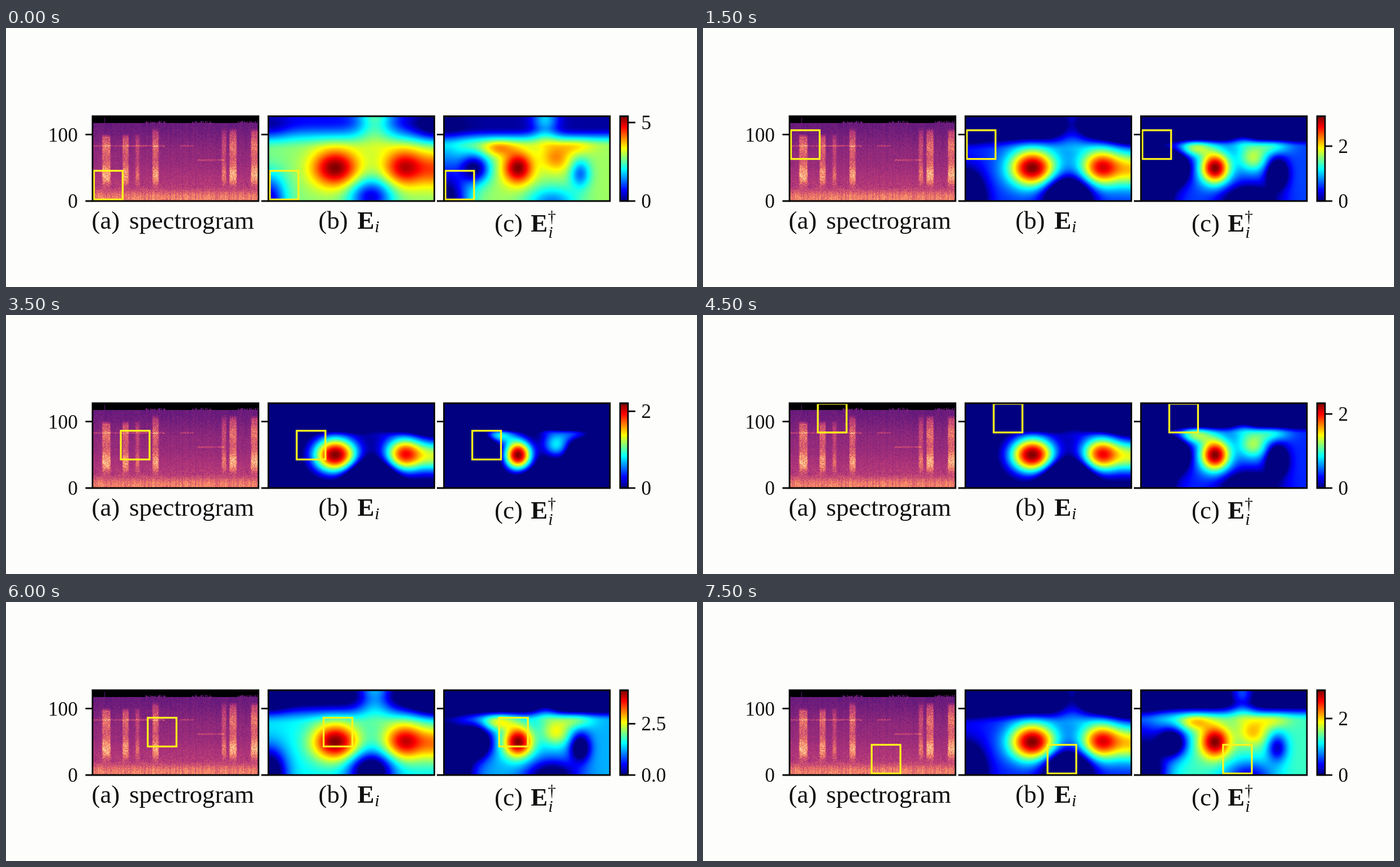
Recreate the animation shown at these times as an HTML page with a canvas. Size 1222x458 px, loop 8 s.

```html
<!DOCTYPE html>
<html lang="en">
<head>
<meta charset="utf-8">
<title>Spectrogram and embeddings</title>
<style>
  html, body { margin: 0; width: 100%; height: 100%; overflow: hidden; background: #fdfdfc; }
  canvas, svg { position: absolute; left: 0; top: 0; display: block; }
  text { font-family: "Liberation Serif", "Times New Roman", serif; fill: #101010; }
  .caption { font-size: 44.7px; }
  .axis { font-size: 35px; }
  .sub { font-size: 30px; font-style: italic; }
  .dagger { font-size: 29px; }
  .line { fill: none; stroke: #060606; stroke-width: 2.8; }
  .box { fill: none; stroke: #fdf41c; stroke-width: 3.3; }
</style>
</head>
<body>
<canvas id="maps" width="1222" height="458"></canvas>
<svg id="art" width="1222" height="458" viewBox="0 0 1222 458"></svg>
<script>
const W = 294, H = 150, TOP = 156, BASE = 306;
const PANELS = [153, 464, 774.5];
const BAR = { x: 1086, w: 14 };
const STEP_MS = 500, STEPS = 16, ROWS = 5, FULL = 5.4;

const clamp = (v, lo = 0, hi = 1) => Math.min(hi, Math.max(lo, v));
const ease = (a, b, v) => { const t = clamp((v - a) / (b - a)); return t * t * (3 - 2 * t); };
const bell = (v, mid, width) => Math.exp(-(((v - mid) / width) ** 2));
const blob = (x, y, mx, my, sx, sy) => bell(x, mx, sx) * bell(y, my, sy);

// Each map is a background level rising from the top edge, with hills and hollows.
const levelB = (x, y) => .13 + .38 * ease(8, 60, y)
  + .49 * blob(x, y, 118, 91, 41, 33)
  + .43 * blob(x, y, 241, 90, 38, 33)
  + .25 * blob(x, y, 300, 94, 32, 32)
  + .32 * blob(x, y, 188, 0, 32, 42)
  - .28 * blob(x, y, 300, 20, 45, 28)
  - .12 * blob(x, y, 0, 20, 35, 25)
  - .42 * blob(x, y, 181, 142, 38, 32)
  - .44 * blob(x, y, 0, 148, 30, 45);

const levelC = (x, y) => .03 + .5 * ease(18, 54, y)
  + .47 * blob(x, y, 130, 91, 26, 28)
  + .2 * blob(x, y, 95, 56, 28, 14)
  + .2 * blob(x, y, 198, 74, 26, 24)
  + .12 * blob(x, y, 232, 54, 30, 14)
  + .3 * blob(x, y, 178, 0, 24, 42)
  - .3 * blob(x, y, 240, 101, 18, 25)
  - .5 * blob(x, y, 54, 92, 26, 26)
  - .36 * blob(x, y, 0, 115, 40, 75)
  - .3 * blob(x, y, 5, 150, 40, 35)
  - .28 * blob(x, y, 190, 152, 45, 28);

// Key points: step, colour scale maximum, cut-off of the right-hand map.
const KEYS = [[0, FULL, 0], [1, 3.9, .25], [3, 3.09, .42], [5, 3.26, .27], [7, 2.21, .6],
  [9, 2.29, .44], [10, 4.2, .35], [13, 4.1, .32], [15, 3, .17]];

function keyed(step, item) {
  const i = KEYS.findIndex(key => key[0] >= step);
  if (KEYS[i][0] === step) return KEYS[i][item];
  const a = KEYS[i - 1], b = KEYS[i];
  return a[item] + (b[item] - a[item]) * (step - a[0]) / (b[0] - a[0]);
}

function makeField(level) {
  const field = new Float32Array(W * H);
  let peak = 0;
  for (let i = 0; i < field.length; i++) {
    field[i] = level(i % W, Math.floor(i / W));
    peak = Math.max(peak, field[i]);
  }
  return field.map(v => v / peak);
}

const jet = v => [3, 2, 1].map(c => 255 * clamp(1.5 - Math.abs(4 * v - c)));

const MAGMA = [[0, 0, 4], [81, 18, 124], [183, 55, 121], [252, 137, 97], [252, 253, 191]];
function magma(v) {
  const p = clamp(v) * 4, i = Math.min(3, Math.floor(p));
  return MAGMA[i].map((c, n) => c + (MAGMA[i + 1][n] - c) * (p - i));
}

function random(seed) {
  return () => {
    seed = seed + 0x6D2B79F5 | 0;
    let t = Math.imul(seed ^ seed >>> 15, 1 | seed);
    t = t + Math.imul(t ^ t >>> 7, 61 | t) ^ t;
    return ((t ^ t >>> 14) >>> 0) / 4294967296;
  };
}

const ctx = document.getElementById("maps").getContext("2d");

function paint(left, width, colour) {
  const img = ctx.createImageData(width, H);
  for (let y = 0, n = 0; y < H; y++) {
    for (let x = 0; x < width; x++) {
      for (const c of colour(x, y)) img.data[n++] = c;
      img.data[n++] = 255;
    }
  }
  ctx.putImageData(img, Math.round(left), TOP);
}

// Vertical calls: centre and half width.
const CALLS = [[24, 7], [58, 5], [79, 3], [111, 5], [232, 3.5], [248, 6], [286, 6]];
// Horizontal streaks: left, right and height.
const STREAKS = [[2, 127, 52], [155, 178, 52], [186, 232, 77]];

function paintSpectrogram() {
  const rnd = random(71);
  const columns = Array.from({ length: W }, () => rnd() - .5);
  const edge = columns.map((_, x) => {
    const raised = Math.sin(x / 13 - .7) > .2 && x > 80;
    return raised && rnd() > .3 ? 7 + rnd() * 4 : 12;
  });
  paint(PANELS[0], W, (x, y) => {
    const noise = rnd() + rnd() - 1;
    if (y < edge[x]) return magma(x === 21 && y > 2 ? .27 : 0);
    let v = .31 + .1 * ease(10, 75, y) + .08 * ease(70, 125, y) + .22 * ease(122, 145, y);
    v += noise * (.07 + .07 * ease(95, 140, y));
    v += columns[x] * (.03 + .12 * ease(128, 142, y));
    const shape = .55 + .3 * bell(y, 52, 16) + .55 * bell(y, 101, 14);
    for (const [mid, half] of CALLS) {
      const top = mid < 100 ? 29 : 20;
      const across = 1 - ease(half - 1.5, half + 2, Math.abs(x - mid));
      const along = ease(top, top + 9, y) * (1 - ease(110, 134, y));
      v += across * along * shape * Math.min(.34, half * .06) * (1 + noise * .5);
    }
    for (const [a, b, row] of STREAKS) {
      if (x >= a && x <= b && Math.abs(y - row) <= 1) v += .11 + noise * .1;
    }
    return magma(Math.min(v, .92));
  });
}

const art = document.getElementById("art");
function add(tag, attrs, content = "") {
  const el = document.createElementNS("http://www.w3.org/2000/svg", tag);
  for (const key in attrs) el.setAttribute(key, attrs[key]);
  el.textContent = content;
  return art.appendChild(el);
}
const line = d => add("path", { class: "line", d });
const label = (x, y, content, cls = "caption", extra = {}) => add("text", { x, y, class: cls, ...extra }, content);

const boxes = PANELS.map(() => add("rect", { class: "box", width: 50.8, height: 50.8 }));
for (const x of PANELS) {
  line(`M${x} ${TOP}h293.5V${BASE}H${x}z`);
  line(`M${x - 12.5} 188.3h12M${x - 12.5} ${BASE}h12`);
}
line(`M${BAR.x} ${TOP}h${BAR.w}V${BASE}h${-BAR.w}z`);
line(`M${BAR.x + BAR.w + 1} ${BASE}h12`);
const tick = line("M1101 0h12");

const right = { "text-anchor": "end" }, bold = { "font-weight": "bold" };
label(127, 200.5, "100", "axis", right);
label(127, 318, "0", "axis", right);
const low = label(1123.5, 318, "0", "axis");
const high = label(1123.5, 0, "", "axis");

label(151.5, 354.5, "(a)");
label(218, 354.5, "spectrogram");
label(552.5, 354.5, "(b)");
label(621.5, 354.5, "E", "caption", bold);
label(652, 361, "i", "sub");
label(864, 360, "(c)");
label(928, 360, "E", "caption", bold);
label(958, 343, "†", "dagger");
label(959, 371, "i", "sub");

const fieldB = makeField(levelB), fieldC = makeField(levelC);
const paintField = (left, field, cut) =>
  paint(left, W, (x, y) => jet(clamp((field[y * W + x] - cut) / (1 - cut))));

function show(step) {
  const max = keyed(step, 1);
  paintField(PANELS[1], fieldB, .96 * (1 - max / FULL));
  paintField(PANELS[2], fieldC, keyed(step, 2));

  const dx = 2.5 + 47.6 * Math.floor(step / ROWS);
  const y = 252.5 - 23.9 * (step % ROWS);
  boxes.forEach((box, i) => {
    box.setAttribute("x", PANELS[i] + dx);
    box.setAttribute("y", y);
  });

  const mark = max > 5 ? 5 : max > 4 ? 2.5 : 2;
  const markY = BASE - H * mark / max;
  tick.setAttribute("d", `M1101 ${markY}h12`);
  high.setAttribute("y", markY + 12);
  high.textContent = mark;
  low.textContent = mark === 2.5 ? "0.0" : "0";
}

paintSpectrogram();
paint(BAR.x, BAR.w, (x, y) => jet(1 - y / (H - 1)));

let shown = -1;
function frame(now) {
  const step = Math.floor(now / STEP_MS) % STEPS;
  if (step !== shown) show(shown = step);
  requestAnimationFrame(frame);
}
show(shown = 0);
requestAnimationFrame(frame);
</script>
</body>
</html>
```
